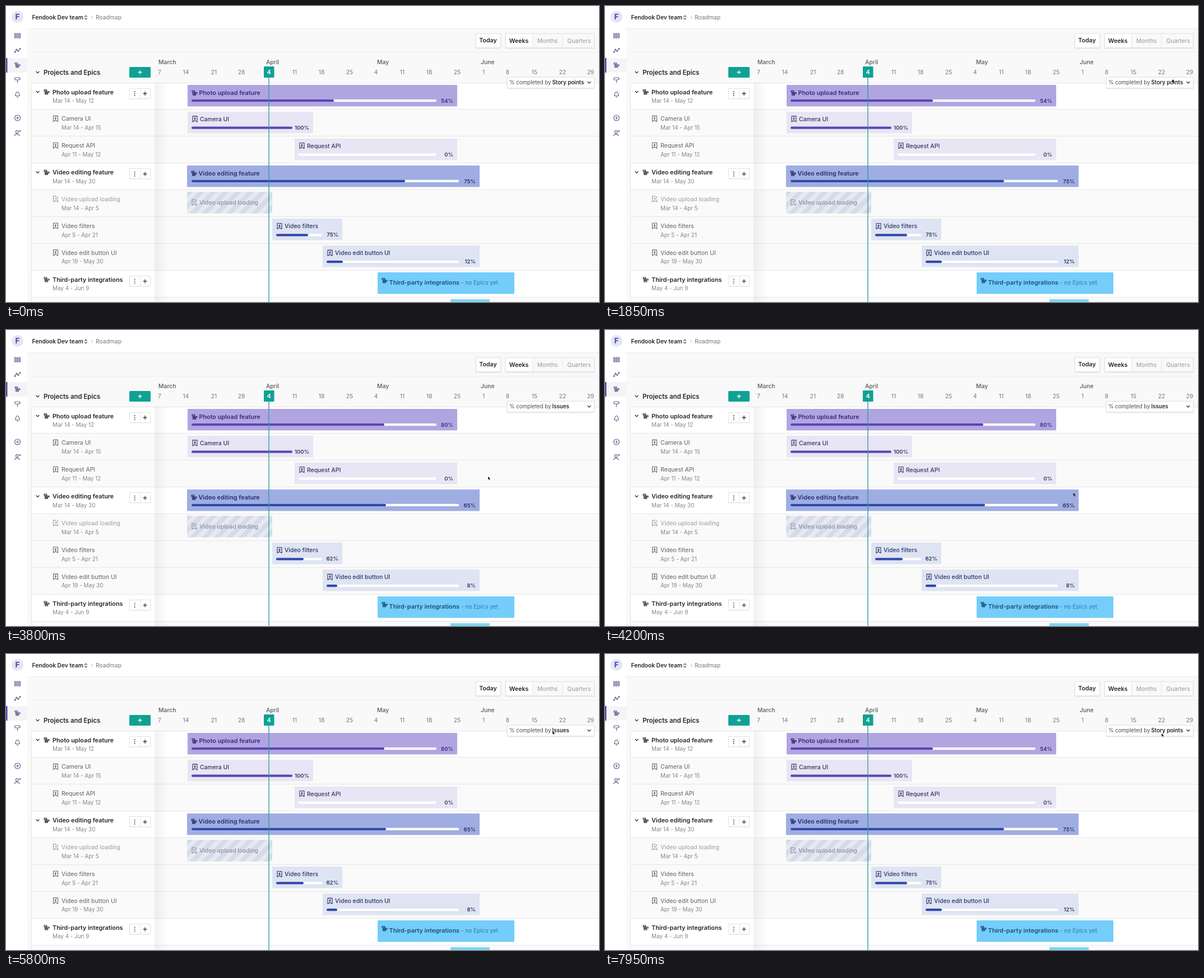
An HTML page with a canvas that plays this animation: 1058 px wide and 529 px high, repeating every 8 s.

```html
<!DOCTYPE html>
<html lang="en">
<head>
<meta charset="utf-8">
<title>Roadmap</title>
<style>
html, body { margin: 0; width: 100%; height: 100%; overflow: hidden; background: #fff; }
canvas { display: block; }
</style>
</head>
<body>
<canvas id="stage" width="1058" height="529"></canvas>
<script>
const ctx = document.getElementById('stage').getContext('2d');
const LOOP = 8000, ROW = 47.9, TOP = 136.5;
const OPEN = [[2000, 3150], [6200, 7150]];      // popup visible
const TIP = [4600, 5250];                       // tooltip visible
const INK = '#26272c', GREY = '#77787c', TEAL = '#0fa294', LINE = '#e6e6e8';

// Pointer path: time, x, y
const PATH = [[400, 930, 230], [850, 1012, 131], [2150, 1012, 131], [2800, 900, 220], [3200, 900, 220],
  [3800, 860, 262], [4500, 820, 310], [5200, 820, 310], [5800, 975, 138], [6250, 975, 138],
  [6750, 911, 205], [7050, 905, 188], [7250, 905, 188], [7950, 993, 142]];

// Roadmap rows; a bar's fill and pct hold [story points, issues]
const ROWS = [
  { name: 'Photo upload feature', dates: 'Mar 14 - May 12', project: 1, open: 1, x: 324, end: 805, color: '#b1a5e1',
    ink: '#392c7c', fillColor: '#5c45b1', track: [331, 768], fill: [585, 675], pct: [54, 80] },
  { name: 'Camera UI', dates: 'Mar 14 - Apr 15', x: 324, end: 548, color: '#e8e5f5',
    ink: '#39345f', fillColor: '#5c45b1', track: [331, 511], fill: [511, 511], pct: [100, 100] },
  { name: 'Request API', dates: 'Apr 11 - May 12', x: 515, end: 805, color: '#e8e5f5',
    ink: '#39345f', fillColor: '#5c45b1', track: [522, 768], fill: [522, 522], pct: [0, 0] },
  { name: 'Video editing feature', dates: 'Mar 14 - May 30', project: 1, open: 1, x: 323, end: 845, color: '#9fade2',
    ink: '#24326f', fillColor: '#3049ab', track: [331, 808], fill: [712, 678], pct: [75, 65] },
  { name: 'Video upload loading', dates: 'Mar 14 - Apr 5', done: 1, x: 323, end: 475, color: '#e6e9f1', ink: '#8a8ea2' },
  { name: 'Video filters', dates: 'Apr 5 - Apr 21', x: 475, end: 600, color: '#dfe4f3',
    ink: '#2a3663', fillColor: '#3049ab', track: [482, 564], fill: [539, 531], pct: [75, 62] },
  { name: 'Video edit button UI', dates: 'Apr 19 - May 30', x: 565, end: 845, color: '#dfe4f3',
    ink: '#2a3663', fillColor: '#3049ab', track: [572, 808], fill: [601, 591], pct: [12, 8] },
  { name: 'Third-party integrations', dates: 'May 4 - Jun 9', project: 1, x: 663, end: 907, color: '#74cdfb', ink: '#1d4e77' }
];

const ease = p => p * p * (3 - 2 * p);
const clamp = v => Math.max(0, Math.min(1, v));
const within = (t, [a, b]) => t >= a && t < b;

function text(str, x, y, size, weight = 400, color = INK, align = 'left') {
  ctx.font = `${weight} ${size}px Inter, sans-serif`;
  ctx.textAlign = align;
  ctx.fillStyle = color;
  ctx.fillText(str, x, y);
}

function rect(x, y, w, h, color, r = 0) {
  ctx.fillStyle = color;
  ctx.beginPath();
  ctx.roundRect(x, y, w, h, r);
  ctx.fill();
}

function card(x, y, w, h, blur = 2) {
  ctx.save();
  ctx.shadowColor = 'rgba(0,0,0,.14)';
  ctx.shadowBlur = blur;
  ctx.shadowOffsetY = blur / 3;
  rect(x, y, w, h, '#fff', 1.5);
  ctx.restore();
  ctx.strokeStyle = '#e4e4e6';
  ctx.lineWidth = 1;
  ctx.strokeRect(x + .5, y + .5, w - 1, h - 1);
}

function stroke(d, x, y, color, width = 1.2) {
  ctx.save();
  ctx.translate(x, y);
  ctx.strokeStyle = color;
  ctx.lineWidth = width;
  ctx.lineCap = ctx.lineJoin = 'round';
  ctx.stroke(new Path2D(d));
  ctx.restore();
}

// Icons are placed by their centre
const chevron = (x, y) => stroke('M-2.5-1.2L0 1.3L2.5-1.2', x, y, '#333', 1.3);
const plus = (x, y, color) => stroke('M-3 0H3M0-3V3', x, y, color, 1.3);
const roadmap = (x, y, color) =>
  stroke('M-4.5-3.8H.2V-1.6H-4.5ZM-.8-.6H4.5V1.2H-.8ZM-2.8 2.4H2V4.2H-2.8ZM-3-1.5V.3H-1M-3 .3V3', x, y, color, 1.2);
const bookmark = (x, y, color, done) => stroke(done
  ? 'M1-5H-4V5L0 2.8L4 5V1M-1-1.5L.8 .3L4.4-4.4'
  : 'M-4-5H4V5L0 2.8L-4 5ZM.8-3L-1.2-.6H1.2L-.8 1.6', x, y, color, 1.1);

function sidebar() {
  const c = '#62668f';
  rect(0, 0, 38, 529, '#fff');
  rect(0, 93, 38, 26, '#f4f4f7');
  rect(0, 93, 2.5, 26, '#4b50ad');
  rect(10, 9, 21, 21, '#e4e5f4', 10.5);
  text('F', 20.5, 24, 13.5, 700, '#4347a0', 'center');
  stroke('M-5-4H-3V4H-5ZM-1-4H1V4H-1ZM3-4H5V4H3Z', 20.5, 53, c);
  stroke('M-4.5 3L-1.8-1.5L1.3 1L4.5-3', 20.5, 79.5, c);
  for (const [x, y] of [[16, 82.5], [18.7, 78], [21.8, 80.5], [25, 76.5]]) rect(x - 1.4, y - 1.4, 2.8, 2.8, c, 1.4);
  roadmap(20.5, 105.5, c);
  stroke('M-4-4H3L5-2L3 0H-4L-5-2ZM0 0V5', 20.5, 132, c);
  stroke('M-4 2.5C-2.8 1-3.5-4.5 0-4.5S2.8 1 4 2.5ZM-1 4.7H1', 20.5, 158, c);
  stroke('M5 0A5 5 0 1 1-5 0A5 5 0 1 1 5 0M-2.2 0H2.2M0-2.2V2.2', 20.5, 200, c);
  stroke('M1.5-2A2.3 2.3 0 1 1-3.1-2A2.3 2.3 0 1 1 1.5-2M-5 5C-4.5 .8 2.9 .8 3.4 5M3-3.5H5.6M4.3-4.8V-2.2', 20.5, 227, c);
}

function header() {
  rect(38, 0, 1020, 40, '#fff');
  rect(38, 40, 1020, 1, '#ebebed');
  text('Fendook Dev team', 46.5, 24, 10.2, 600);
  stroke('M-1.8-1.3L0-3.3L1.8-1.3M-1.8 1.3L0 3.3L1.8 1.3', 142.5, 20.5, '#444');
  stroke('M-1-2L1 0L-1 2', 154, 20.5, '#a5a5a8', 1);
  text('Roadmap', 160, 24, 10.3, 400, GREY);
  rect(45, 82, 1013, 1, '#ededef');

  card(838, 49, 45, 26);
  text('Today', 860, 65, 10.6, 600, INK, 'center');
  card(891, 49, 159, 26);
  rect(940, 50, 109, 24, '#f9f9fa');
  rect(939, 49, 1, 26, LINE);
  rect(992, 49, 1, 26, LINE);
  text('Weeks', 915, 65.5, 10.6, 600, INK, 'center');
  text('Months', 966, 65.5, 10.3, 400, '#98999d', 'center');
  text('Quarters', 1022.5, 65.5, 10.3, 400, '#98999d', 'center');

  [['March', 272], ['April', 464], ['May', 662], ['June', 847]]
    .forEach(([m, x]) => text(m, x, 103.5, 10.4, 500, '#57585c'));
  const weeks = { 274: 7, 321: 14, 371: 21, 420: 28, 515: 11, 563: 18, 613: 25, 660: 4, 707: 11,
    755: 18, 805: 25, 852: 1, 895: 8, 943: 15, 993: 22, 1043: 29 };
  for (const x in weeks) text(weeks[x], +x, 122, 10.3, 400, GREY, 'center');

  chevron(56.5, 118.5);
  text('Projects and Epics', 67, 122.5, 11.4, 600);
  rect(220, 109, 38, 19, TEAL, 1.5);
  plus(239, 118.5, '#fff');
}

function grid() {
  for (let i = 0; i < 9; i++) {
    const y = Math.round(TOP + ROW * i), white = i % 3 === 0 && i < 4 || i === 7;
    const h = Math.round(TOP + ROW * (i + 1)) - y;
    rect(45, y, 1013, h, white ? '#fff' : '#fafafa');
    rect(45, y, 1013, 1, LINE);
    if (white) rect(45, y + h + 1, 1013, 1, '#f2f2f3');
  }
  const shade = ctx.createLinearGradient(265, 0, 290, 0);
  shade.addColorStop(0, 'rgba(0,0,0,.05)');
  shade.addColorStop(1, 'rgba(0,0,0,0)');
  rect(265, 137, 25, 392, shade);
  rect(45, 137, 1, 392, LINE);
}

function rowLabel(row, y) {
  const x = row.project ? 83 : 99;
  if (row.project) {
    if (row.open) chevron(56.5, y + 17);
    roadmap(72.5, y + 17, '#3c3d43');
    card(220, Math.round(y + 10), 38, 19, 1);
    rect(239, Math.round(y + 10), 1, 19, LINE);
    for (const d of [-3.5, 0, 3.5]) rect(228.8, y + 19.1 + d, 1.8, 1.8, '#333', .9);
    plus(248, y + 20, '#333');
  } else bookmark(88.5, y + 17, row.done ? '#9a9b9f' : '#66676c', row.done);
  text(row.name, x, y + 21, row.project ? 10.8 : 10.5, row.project ? 600 : 400,
    row.project ? INK : row.done ? '#9b9ca0' : '#606166');
  text(row.dates, x, y + 36.5, 9.9, 400, '#85868a');
}

function hatch(x, y, w, h) {
  ctx.save();
  ctx.beginPath();
  ctx.rect(x, y, w, h);
  ctx.clip();
  ctx.strokeStyle = '#d5dbe9';
  ctx.lineWidth = 8;
  ctx.beginPath();
  for (let s = x - h; s < x + w + h; s += 22) {
    ctx.moveTo(s, y + h + 4);
    ctx.lineTo(s + h + 8, y - 4);
  }
  ctx.stroke();
  ctx.restore();
}

function bar(row, y, issues, mix) {
  const w = row.end - row.x;
  const top = Math.round(y + 4.3), ty = y + (row.project ? 22.8 : 21.3);
  rect(row.x, top, w, 38.5, row.color, 1);
  if (row.done) hatch(row.x, top, w, 38.5);
  if (row.project) roadmap(row.x + 12.5, y + 18.7, row.ink);
  else bookmark(row.x + 13, y + (row.done ? 23 : 17.5), row.ink, row.done);
  const lx = row.x + (row.project ? 20.5 : 22), ly = row.track ? ty : y + (row.done ? 27.3 : 26.2);
  text(row.name, lx, ly, row.project ? 10.8 : 10.4, row.project ? 600 : 500, row.ink);
  if (!row.track) {
    if (row.project) text(' - no Epics yet', lx + ctx.measureText(row.name).width, ly, 10.2, 400, '#347ba5');
    return;
  }
  const [a, b] = row.track, by = y + 30.6 + (row.project ? 0 : .6);
  const fillEnd = row.fill[0] + (row.fill[1] - row.fill[0]) * mix;
  rect(a, by, b - a, 4.2, '#fff', 2);
  if (fillEnd > a) rect(a, by, fillEnd - a, 4.2, row.fillColor, 2);
  text(row.pct[+issues] + '%', row.end - 7, y + 36.3, 9.5, 600, row.ink, 'right');
}

function popup(issues) {
  card(814, 150, 236, 87, 5);
  text('Show % completed by', 822, 167, 10.3, 600);
  stroke('M-4-4L4 4M4-4L-4 4', 1036, 163, '#444', 1.1);
  text('Story points completed', 826, 193.5, 10.4, 400, '#606166');
  text('Issues completed', 826, 219.5, 10.4, 400, '#606166');
  stroke('M-3.5 .2L-1 2.6L3.5-2.3', 1032, issues ? 216 : 190, '#333', 1.4);
}

function tooltip() {
  rect(778, 278, 97, 22, '#2c2c2e', 1);
  ctx.fill(new Path2D('M821 300H831L826 305Z'));
  text('56 out of 87 Issues', 826.5, 292.7, 9.8, 500, '#fff', 'center');
}

function pointer(t) {
  if (t < PATH[0][0]) return;
  let i = PATH.findIndex(p => p[0] > t);
  if (i < 0) i = PATH.length - 1;
  const [t0, x0, y0] = PATH[i - 1], [t1, x1, y1] = PATH[i];
  const p = ease(clamp((t - t0) / (t1 - t0)));
  ctx.save();
  ctx.translate(x0 + (x1 - x0) * p, y0 + (y1 - y0) * p);
  ctx.fillStyle = '#111';
  ctx.fill(new Path2D('M0 0V5L1.2 4L2.3 6.3L3.4 5.8L2.4 3.7H4Z'));
  ctx.restore();
}

function draw(t) {
  const [on, off] = OPEN.map(span => span[1]);
  const issues = t >= on && t < off;
  const mix = ease(clamp((t - on) / 300)) - ease(clamp((t - off) / 300));
  rect(0, 0, 1058, 529, '#f9f9fa');
  header();
  grid();
  sidebar();
  ROWS.forEach((row, i) => {
    rowLabel(row, TOP + ROW * i);
    bar(row, TOP + ROW * i, issues, mix);
  });
  rect(793, 524, 70, 5, '#80d6f1');
  rect(468.3, 128, 1.4, 401, '#329d9c');
  rect(460, 108, 18.5, 20, TEAL, 1);
  text('4', 469, 122, 10.8, 600, '#fff', 'center');

  card(894, 127, 156, 20);
  text('% completed by', 898, 139.7, 9.7, 400, '#4c4d52');
  text(issues ? 'Issues' : 'Story points', 974.5, 139.7, 9.7, 600);
  chevron(1040.5, 136.7);
  if (OPEN.some(span => within(t, span))) popup(issues);
  if (within(t, TIP)) tooltip();
  pointer(t);
}

function tick() {
  draw(performance.now() % LOOP);
  requestAnimationFrame(tick);
}
tick();
</script>
</body>
</html>
```
